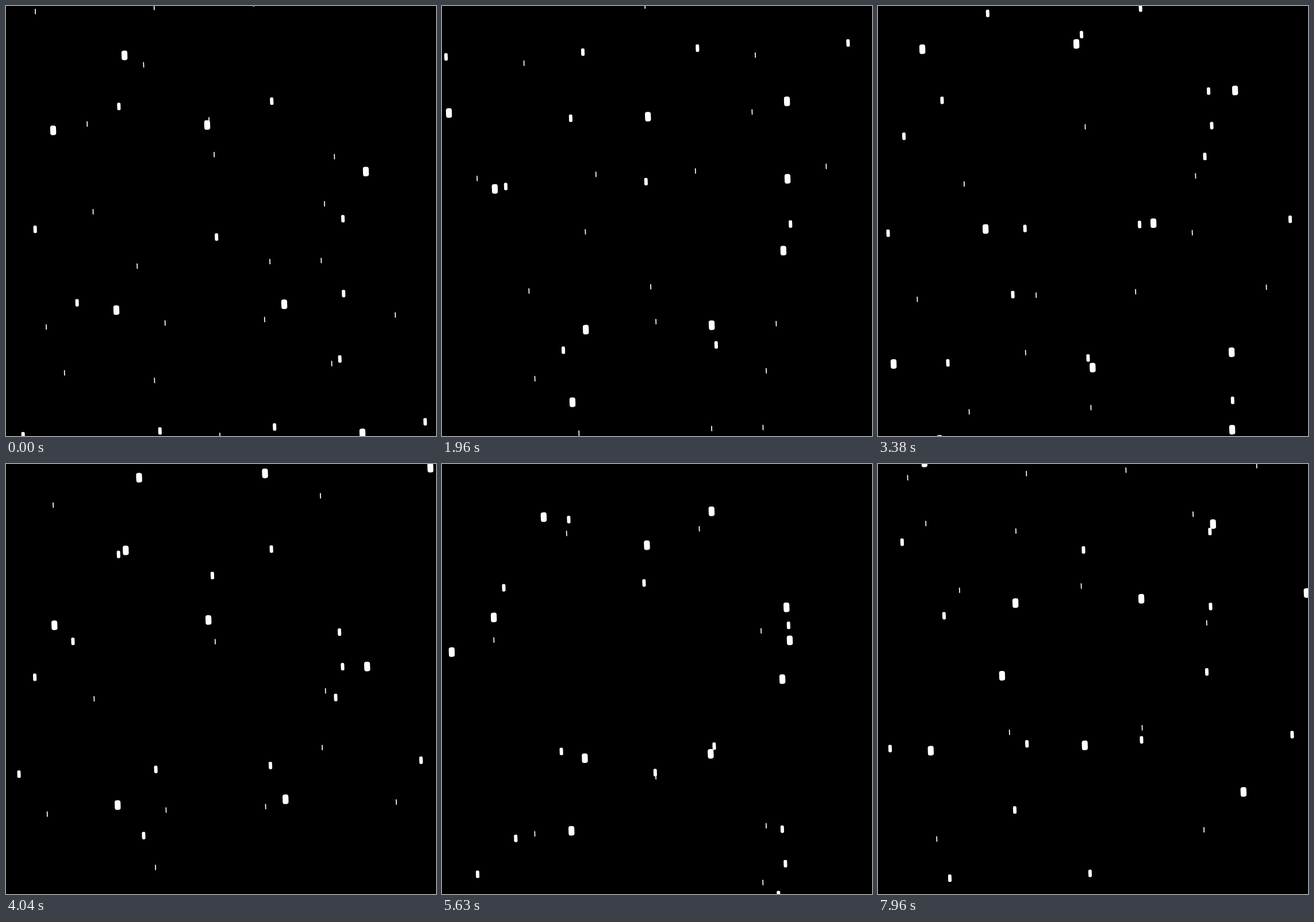
Write an HTML page with a canvas that moves like this. It is 748x748 px and loops after 8000 ms.

```html
<!DOCTYPE html>
<html lang="en">
<head>
<meta charset="utf-8">
<title>Falling flakes</title>
<style>
  html, body { margin: 0; width: 100%; height: 100%; overflow: hidden; background: #000; }
  canvas { display: block; width: 748px; height: 748px; }
</style>
</head>
<body>
<canvas id="stage" width="748" height="748"></canvas>
<script>
const ctx = document.getElementById('stage').getContext('2d');
const SIZE = 748;
const LOOP = 8000;
const FPS = 24;
const TILT = 0.0346;   // the whole field leans; flakes fall straight down inside it
const CENTER = 359;    // layers shrink towards this column
const PERIOD = 2171;   // fall distance of the nearest layer before it repeats
const MARGIN = 60;

// One pattern for all layers: rows of flakes, each [y, ...xs]
const rows = [
  [-399, 351.4],
  [-282.6, 80.8, 590.3],
  [-158, 578.8],
  [-32.5, -31, 230.6, 449.7, 737.6],
  [93, 203],
  [219, 74.5, 342.6],
  [309.5, 615.7],
  [535.3, 173.6, 465.8],
  [764.4, 5.6, 594]
];

// Far to near; every layer carries the pattern twice, the second one shifted by gap
const layers = [
  { scale: 0.7905, speed: 6.184, top: 37, gap: 549.3 },
  { scale: 0.9105, speed: 9.027, top: -306, gap: 1083.6 },
  { scale: 1, speed: 12.846, top: 0, gap: -1181.7 }
];

function drawFlake(x, y, near) {
  const w = 1.7 + 4.25 * near;
  const h = 9.5 + 3.55 * near;
  ctx.beginPath();
  ctx.roundRect(x - w / 2, y - h / 2, w, h, w * 0.37);
  ctx.fill();
}

function drawLayer({ scale, speed, top, gap }, near, step) {
  for (const [rowY, ...xs] of rows) {
    for (const shift of [0, gap]) {
      const fall = rowY * scale + top + shift + speed * step + MARGIN;
      if (fall < 0) continue; // has not come in yet
      const y = fall % (PERIOD * scale) - MARGIN;
      if (y > SIZE + MARGIN) continue;
      for (const x of xs) drawFlake(CENTER + (x - CENTER) * scale, y, near);
    }
  }
}

function draw(time) {
  // the motion steps at 24 pictures a second
  const step = Math.floor((time % LOOP + 4.9) * FPS / 1000) % (LOOP * FPS / 1000);
  ctx.resetTransform();
  ctx.fillStyle = '#000';
  ctx.fillRect(0, 0, SIZE, SIZE);
  ctx.fillStyle = '#fff';
  ctx.rotate(-TILT);
  layers.forEach((layer, near) => drawLayer(layer, near, step));
}

const start = performance.now();
function tick() {
  draw(performance.now() - start);
  requestAnimationFrame(tick);
}
tick();
</script>
</body>
</html>
```
